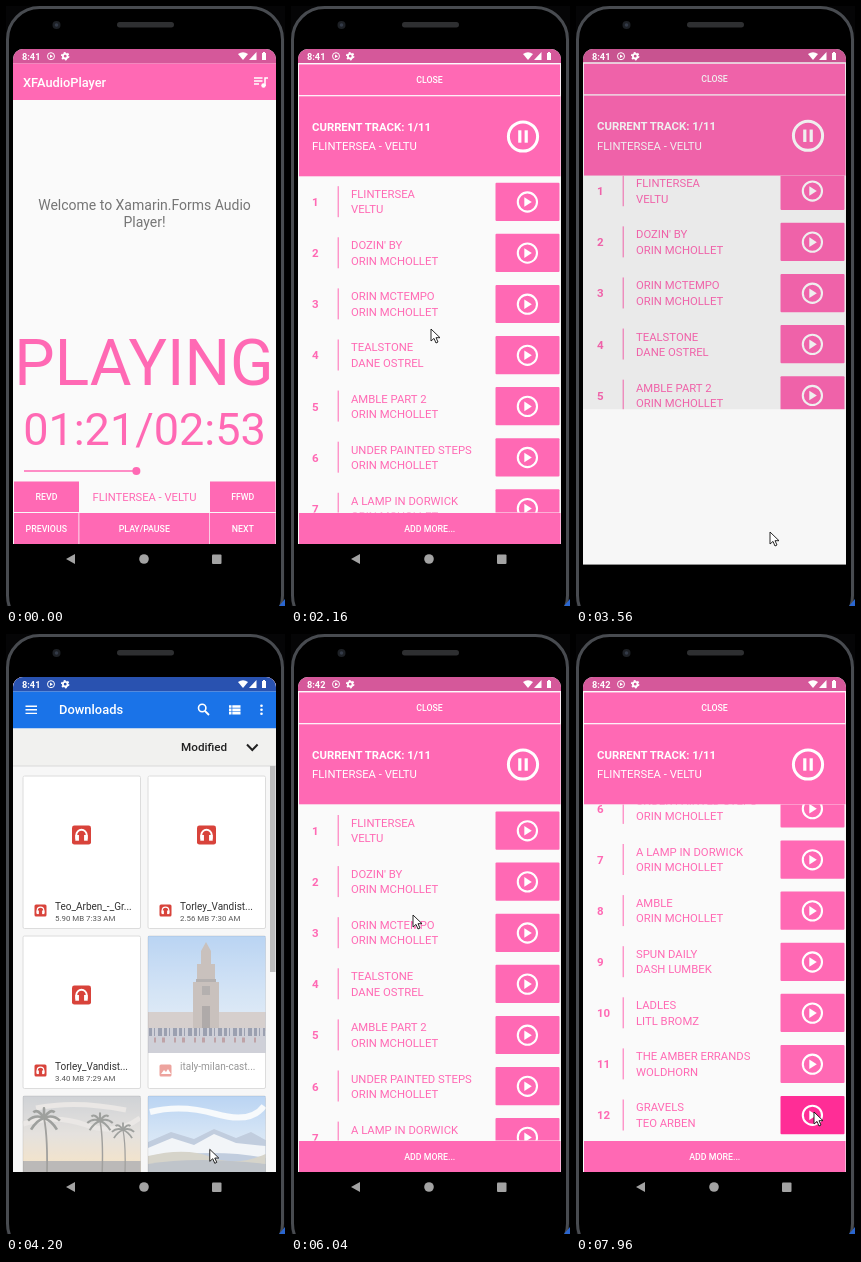
An HTML page that plays this animation: 279x600 px, repeating every 8 s.

```html
<!DOCTYPE html>
<html lang="en">
<head>
<meta charset="utf-8">
<title>Audio player</title>
<style>
html, body { margin: 0; width: 100%; height: 100%; overflow: hidden; background: #000; }
svg { display: block; width: 279px; height: 600px; font-family: Roboto, sans-serif; }
</style>
</head>
<body>
<svg id="stage" viewBox="0 0 279 600" xmlns="http://www.w3.org/2000/svg"></svg>
<script>
const LOOP = 8000, STEP = 40, PITCH = 51.1;
const PINK = '#ff69b4', PRESSED = '#ff2d96';

const tracks = [
  ['FLINTERSEA', 'VELTU'], ["DOZIN' BY", 'ORIN MCHOLLET'], ['ORIN MCTEMPO', 'ORIN MCHOLLET'],
  ['TEALSTONE', 'DANE OSTREL'], ['AMBLE PART 2', 'ORIN MCHOLLET'], ['UNDER PAINTED STEPS', 'ORIN MCHOLLET'],
  ['A LAMP IN DORWICK', 'ORIN MCHOLLET'], ['AMBLE', 'ORIN MCHOLLET'], ['SPUN DAILY', 'DASH LUMBEK'],
  ['LADLES', 'LITL BROMZ'], ['THE AMBER ERRANDS', 'WOLDHORN'], ['GRAVELS', 'TEO ARBEN']
];
const nowPlaying = tracks[0].join(' - ');

// markup helpers
const rect = (x, y, w, h, fill, more = '') =>
  `<rect x="${x}" y="${y}" width="${w}" height="${h}" fill="${fill}" ${more}/>`;
const dot = (x, y, r, fill) => `<circle cx="${x}" cy="${y}" r="${r}" fill="${fill}"/>`;
const ring = (x, y, r, w) =>
  `<circle cx="${x}" cy="${y}" r="${r}" fill="none" stroke="#fff" stroke-width="${w}"/>`;
const text = (x, y, size, str, fill = '#fff', more = '') =>
  `<text x="${x}" y="${y}" font-size="${size}" fill="${fill}" ${more}>${str}</text>`;
const line = (d, color, width, more = '') =>
  `<path d="${d}" fill="none" stroke="${color}" stroke-width="${width}" ${more}/>`;
const shape = (d, fill) => `<path d="${d}" fill="${fill}"/>`;
const group = (body, attrs) => `<g ${attrs}>${body}</g>`;
const place = (x, y, scale, body) => group(body, `transform="translate(${x} ${y}) scale(${scale})"`);
const MID = 'text-anchor="middle"', MEDIUM = 'font-weight="500"', BOLD = 'font-weight="700"';
const button = (x, y, w, h, label, id = '') =>
  rect(x, y, w, h, PINK, id && `id="${id}"`) +
  text(x + w / 2, y + h / 2 + 3.2, 8.8, label, '#fff', MID + ' ' + MEDIUM);

function phone() {
  return rect(0, 0, 279, 600, '#050506') +
    rect(1.5, 1.5, 275, 620, '#000', 'rx="32" stroke="#484b50" stroke-width="3"') +
    rect(111, 16, 57, 5.5, '#2e2f31', 'rx="2.7"') +
    dot(50.5, 19, 4, '#1d2025') + dot(50.5, 19, 1.8, '#343b48') +
    shape('M279 593L273 600H279Z', '#2a66d0') +
    shape('M60 553L69 548V558Z', '#a3a3a3') + dot(138, 553, 4.8, '#a3a3a3') +
    rect(206, 548.5, 9.5, 9.5, '#a3a3a3', 'rx="1"');
}

function statusIcons() {
  return text(16, 53.6, 9.2, '8:41', '#fff', BOLD + ' id="clock"') +
    ring(45, 50.2, 3.5, 1) + shape('M44 48.500L47 50.200L44 52Z', '#fff') +
    ring(59.2, 50.2, 2.3, 1.8) +
    `<circle cx="59.200" cy="50.200" r="3.500" fill="none" stroke="#fff" stroke-width="1.500" stroke-dasharray="1.800 1.865"/>` +
    shape('M232 48Q237 44.500 242 48L237 54Z', '#fff') +
    shape('M250.500 46V54H243Z', '#fff') +
    shape('M256 47H257V46H259V47H260V54H256Z', '#fff');
}

function mainPage() {
  return rect(7, 43, 263, 495, '#fafafa') + rect(7, 43, 263, 14.5, '#d5589a') +
    rect(7, 57.5, 263, 36.5, PINK) +
    text(17, 80.6, 12.8, 'XFAudioPlayer', '#fff', MEDIUM) +
    line('M248 72H256.500M248 75H256.500M248 78H253M259 80V72H262', '#fff', 1.5) + dot(257.5, 79.5, 2.2, '#fff') +
    text(138.5, 204, 14, 'Welcome to Xamarin.Forms Audio', '#757575', MID) +
    text(138.5, 220.5, 14, 'Player!', '#757575', MID) +
    text(138, 378.5, 64, 'PLAYING', PINK, MID) +
    text(138.5, 439, 45, '', PINK, MID + ' id="timer"') +
    line('', PINK, 1.5, 'id="bar"') + `<circle id="thumb" cy="465" r="4" fill="${PINK}"/>` +
    button(8, 475.5, 65, 30.5, 'REVD') + button(204, 475.5, 65.5, 30.5, 'FFWD') +
    text(138.5, 495, 11.2, nowPlaying, PINK, MID) +
    button(8, 507, 64.5, 31, 'PREVIOUS') + button(73.3, 507, 130, 31, 'PLAY/PAUSE') +
    button(204, 507, 65.5, 31, 'NEXT');
}

const trackRow = ([title, artist], i) => place(0, i * PITCH, 1,
  text(21, 201, 11.5, i + 1, PINK, BOLD) + line('M47.200 181V212', PINK, 1) +
  text(60, 193, 11.3, title, PINK) + text(60, 208.3, 11.3, artist, PINK) +
  rect(204.5, 177.5, 64, 38.2, PINK, `rx="1" id="play${i + 1}"`) +
  ring(236.4, 196.8, 9.6, 2.1) + shape('M233.300 192L240.800 196.800L233.300 201.600Z', '#fff'));

function listPage() {
  return rect(7, 57, 263, 481, '#fafafa') +
    rect(7.5, 58, 262, 31.5, PINK, 'stroke="#fff" stroke-width=".8"') +
    text(138.5, 77, 8.8, 'CLOSE', '#fff', MID + ' ' + MEDIUM) +
    rect(8, 90.3, 261.5, 80, PINK) +
    text(21, 125, 11.35, 'CURRENT TRACK: 1/11', '#fff', BOLD) +
    text(21, 144.3, 11.3, nowPlaying) +
    ring(232, 130.5, 14.6, 3) + [227.2, 233.6].map(x => rect(x, 124.3, 3.2, 12.4, '#fff')).join('') +
    group(group(tracks.map(trackRow).join(''), 'id="rows"'), 'clip-path="url(#rowsClip)"') +
    button(8, 507, 261.5, 31, 'ADD MORE...', 'add');
}

const card = (x, y) => rect(x, y, 117.5, 152.5, '#fff', 'rx="1.5" stroke="#dcdcdc"');
const headphones = (x, y, size) => place(x, y, size / 20,
  rect(-10, -10, 20, 20, '#d8433b', 'rx="2.5"') +
  line('M-5.500 4V0A5.500 5.500 0 0 1 5.500 0V4', '#fff', 2) +
  rect(-6.5, 0, 3.8, 6, '#fff') + rect(2.7, 0, 3.8, 6, '#fff'));
const audioCard = (x, y, name, info) => card(x, y) +
  headphones(x + 58.5, y + 59, 19) + headphones(x + 17.5, y + 134.5, 12) +
  text(x + 32, y + 134, 10, name, '#333') + text(x + 32, y + 145, 7.9, info, '#555');
// files that cannot be picked look washed out
const photo = (x, y, body) => card(x, y) +
  place(x, y, 1, group(body, 'opacity=".55"'));

const castle = () => rect(0, 0, 117.5, 117, 'url(#sky)') +
  shape('M0 76H117.500V95H0Z', '#b5a8a6') +
  shape('M45 92V46H49V28H53V15L58 6L63 15V28H67V46H71V92Z', '#9d9088') +
  rect(48, 43, 20, 3, '#77706f') + rect(54, 50, 8, 9, '#77706f') + rect(54, 70, 8, 22, '#6f6663') +
  rect(0, 92, 117.5, 25, '#a9abba') +
  line('M1 96H117', '#4b5470', 8, 'stroke-dasharray="3 2 1 3 4 2"') +
  line('M6 104H113', '#8c5860', 5, 'stroke-dasharray="2 6 3 9"');

const palm = (x, y, size) => place(x, y, size,
  line('M0 0Q5 25 2 80', '#55544f', 1.8) +
  [0, 1, 2, 3, 4, 5, 6].map(i => {
    const a = Math.PI * (1 - i / 3) * .7 - Math.PI / 2, c = Math.cos(a), s = Math.sin(a);
    return line(`M0 0Q${c * 9} ${s * 9 - 3} ${c * 16} ${s * 13 + 4}`, '#50544f', 2.6);
  }).join(''));
const beach = () => rect(0, 0, 117.5, 76, 'url(#dusk)') +
  line('M0 28Q33 18 63 29T117 22M13 12Q53 4 103 14', '#d9d5d0', 5) +
  rect(0, 65, 117.5, 11, '#85817f') + palm(21, 22, 1) + palm(77, 25, .8) + palm(100, 34, .7);

const mountains = () => rect(0, 0, 117.5, 76, 'url(#sky)') +
  line('M2 16Q33 8 68 18T116 10', '#f2f6fa', 6) +
  shape('M0 46L23 36L46 43L66 33L88 42L103 36L117.500 44V76H0Z', '#8fa5c4') +
  shape('M0 52L24 42L46 49L66 38L88 47L117.500 50V62Q68 52 0 62Z', '#e9eef4') +
  shape('M0 60Q38 51 63 61T117.500 58V76H0Z', '#b5b19f') +
  shape('M0 68Q48 60 117.500 68V76H0Z', '#8c95a0');

function filesPage() {
  const cards = audioCard(17, 142, 'Teo_Arben_-_Gr...', '5.90 MB 7:33 AM') +
    audioCard(142, 142, 'Torley_Vandist...', '2.56 MB 7:30 AM') +
    audioCard(17, 302, 'Torley_Vandist...', '3.40 MB 7:29 AM') +
    photo(142, 302, castle()) + rect(153.5, 430.5, 12, 12, '#eda39e', 'rx="1.5"') +
    shape('M155 440L158 436L160 438L162 435L165 440Z', '#fff') +
    text(174, 436, 10, 'italy-milan-cast...', '#979797') +
    photo(17, 462, beach()) + photo(142, 462, mountains()) +
    rect(264, 132, 5.5, 206, '#bdbdbd', 'id="scrollbar"');
  const page = rect(7, 43, 263, 14.5, '#2952b0') + rect(7, 57.5, 263, 37, '#1a73e8') +
    line('M19.500 72.200H31M19.500 75.800H31M19.500 79.400H31', '#fff', 1.4) +
    text(53, 80.3, 12.9, 'Downloads', '#fff', MEDIUM) +
    ring(196.2, 74, 3.7, 1.6) + line('M199 77L203 81', '#fff', 1.8) +
    [72.5, 75.8, 79.1].map(y => line(`M223 ${y}H225.500M226.300 ${y}H234.500`, '#fff', 2.7) + dot(255.5, y * 1.2 - 15.2, 1.3, '#fff')).join('') +
    rect(7, 94.5, 263, 37.5, '#f1f1ef') + rect(7, 131.5, 263, 1, '#d9d9d9') +
    text(175, 117.2, 11.7, 'Modified', '#222', MEDIUM) + line('M241 110.500L246.300 116L251.600 110.500', '#222', 2) +
    group(cards, 'id="cards" clip-path="url(#screen)"');
  return rect(7, 43, 263, 495, '#f7f7f7') + group(page, 'id="files"');
}

const gradient = (id, ...colors) => `<linearGradient id="${id}" x2="0" y2="1">` +
  colors.map((c, i) => `<stop offset="${i / (colors.length - 1)}" stop-color="${c}"/>`).join('') + '</linearGradient>';
const clip = (id, body) => `<clipPath id="${id}">${body}</clipPath>`;
const roundTop = bottom => shape(`M7 ${bottom}V53A10 10 0 0 1 17 43H260A10 10 0 0 1 270 53V${bottom}Z`, '#000');

stage.innerHTML = '<defs>' +
  gradient('sky', '#82b2ea', '#b4d0ee', '#dbe7f2') + gradient('dusk', '#a9aeb5', '#d0cac4', '#f0cf98') +
  clip('screen', roundTop(538)) + clip('tall', roundTop(565)) +
  clip('rowsClip', rect(7, 170.5, 263, 336, '#000')) +
  clip('reveal', rect(7, 43, 263, 520, '#000', 'id="revealBox"')) + '</defs>' +
  phone() +
  group(mainPage() + group(listPage(), 'id="list"') + rect(7, 43, 263, 495, '#000', 'id="dim"'), 'clip-path="url(#screen)"') +
  group(group(group(filesPage(), 'id="filesPos"'), 'id="filesWin" clip-path="url(#reveal)"'), 'clip-path="url(#tall)"') +
  statusIcons() +
  '<path id="cursor" d="M0 0V12L3 9.400L5 14L7 13L5 8.700H9Z" fill="#fff" stroke="#111" stroke-width=".9"/>';

const el = {};
stage.querySelectorAll('[id]').forEach(n => el[n.id] = n);

// progress helpers
const ramp = (t, from, to) => Math.min(1, Math.max(0, (t - from) / (to - from)));
const smooth = u => u * u * (3 - 2 * u);

// pointer moves: start, end, x, y; it rests in between
const moves = [
  [800, 1100, 252, 72], [1320, 2160, 140, 323], [2160, 2560, 172, 528], [2560, 3160, 194, 526],
  [3560, 4280, 205, 514], [4280, 4320, 250, 338], [4520, 5240, 85, 218], [5560, 5720, 96, 224],
  [5720, 6040, 122, 281], [6040, 6400, 135, 342], [6400, 7160, 173, 487], [7280, 7720, 238, 478]
];
function pointer(t) {
  return moves.reduce(([px, py], [from, to, x, y]) => {
    const u = ramp(t, from, to);
    return [px + (x - px) * u, py + (y - py) * u];
  }, [277, 60]);
}

const move = (node, x, y) => node.setAttribute('transform', `translate(${x} ${y})`);
const show = (node, on) => node.setAttribute('display', on ? 'inline' : 'none');
const fill = (node, c) => node.setAttribute('fill', c);

function draw(t) {
  const sec = 81 + (t >= 400) + (t >= 1400), knob = 18 + 240 * sec / 173;
  el.timer.textContent = `01:${sec - 60}/02:53`;
  el.bar.setAttribute('d', `M18 465H${knob}`);
  el.thumb.setAttribute('cx', knob);
  el.clock.textContent = t < 5640 ? '8:41' : '8:42';

  // file picker wipes in from the bottom, later wipes out again
  const open = smooth(ramp(t, 3440, 3790)), back = ramp(t, 5560, 5960);
  const cover = open - smooth(ramp(t, 5560, 5765));
  show(el.filesWin, cover > 0);
  el.revealBox.setAttribute('y', 538 - 495 * cover);
  move(el.filesPos, 0, 21 * (1 - open ** 3 + back));
  show(el.files, t >= 3800);
  show(el.cards, t >= 3960);
  el.scrollbar.setAttribute('opacity', 1 - ramp(t, 4520, 5000));

  const rise = 481 * (1 - ramp(t, 1360, 1660)) ** 2;
  move(el.list, 0, rise - 10 * (open ** 2 - back));
  el.dim.setAttribute('opacity', .15 * (ramp(t, 3440, 3720) - back));
  move(el.rows, 0, t < 4320 ? -11 * smooth(ramp(t, 2120, 2360)) : -277.6 * smooth(ramp(t, 6040, 6320)));
  fill(el.add, t >= 3240 && t < 3440 ? PRESSED : PINK);
  fill(el.play12, t >= 7800 ? PRESSED : PINK);

  show(el.cursor, t >= 760);
  move(el.cursor, ...pointer(t));
}

const start = performance.now();
function tick() {
  const t = (performance.now() - start) % LOOP;
  draw(Math.floor(t / STEP) * STEP);
  requestAnimationFrame(tick);
}
tick();
</script>
</body>
</html>
```
